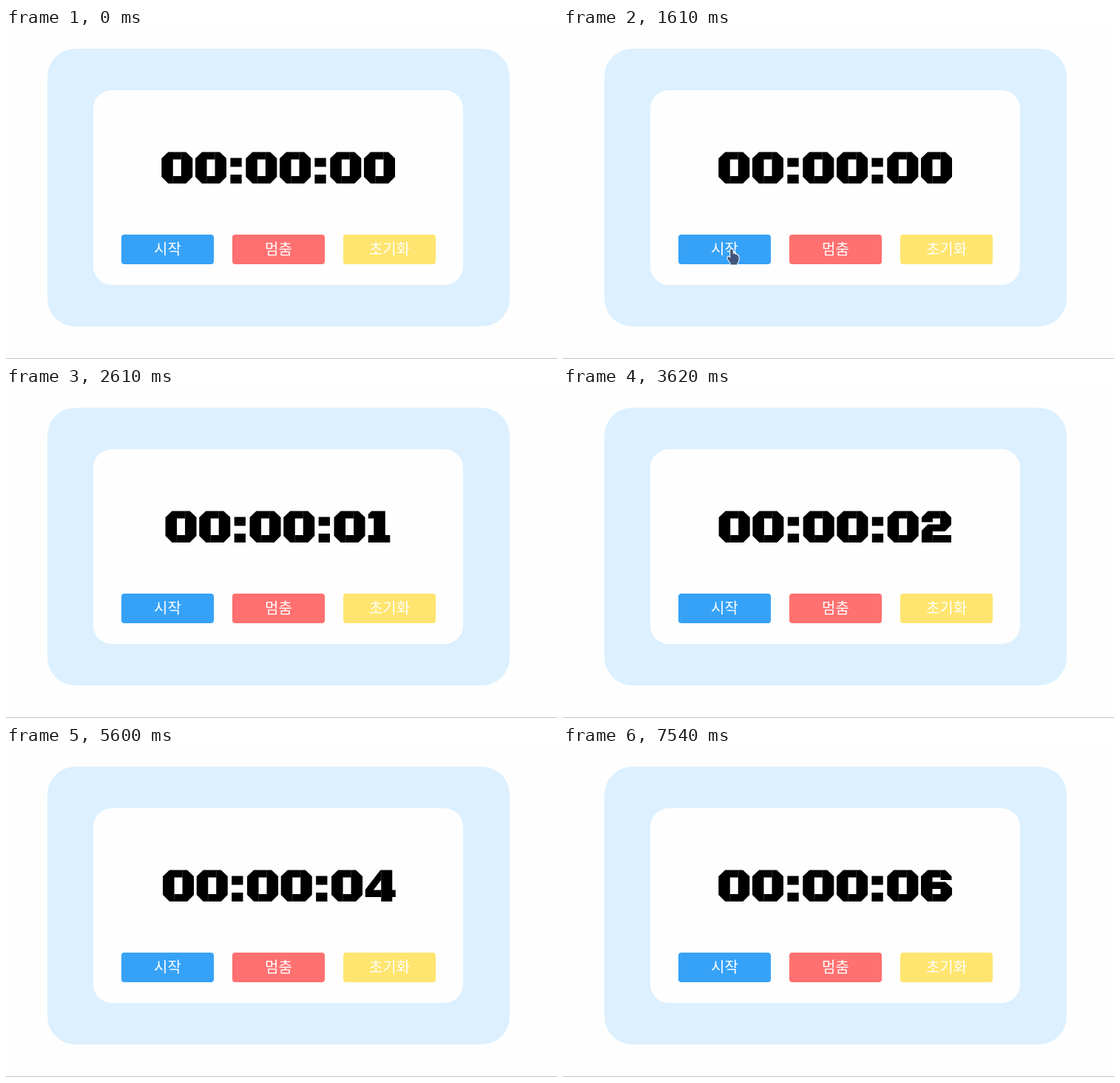
An HTML page with a canvas for the animation above (8000 ms loop, 745 by 447 pixels).

```html
<!DOCTYPE html>
<html lang="ko">
<head>
<meta charset="utf-8">
<title>스톱워치</title>
<style>
  html, body { margin: 0; width: 100%; height: 100%; overflow: hidden; background: #fefefe; }
  canvas { display: block; }
</style>
</head>
<body>
<canvas id="stage" width="745" height="447"></canvas>
<script>
const ctx = document.getElementById('stage').getContext('2d');
const LOOP = 8000;
const TICKS = [2610, 3620, 4610, 5600, 6550, 7540];

// Each glyph: advance width, outline, and hairline seams where its strokes meet.
const glyph = (advance, outline, seams = '') =>
  ({ advance, shape: new Path2D(outline), seams: new Path2D(seams) });

const GLYPHS = {
  '0': glyph(45.7, 'M9 .5H33L42 9V34L33 43H9L0 34V9ZM15.5 10.5V33H26.5V10.5Z', 'M26.5 .5V10.5M15.5 33V43'),
  '1': glyph(35.2, 'M5 .5H23.5V33H30V43H.5V33H8V10.5H.5V5Z'),
  '2': glyph(44.9, 'M9 .5H32L40.5 9V19L32 28H15.5V33H40.5V43H.5V27L9 18.5H25.5V10.5H15.5V15.5H.5V9Z', 'M25.5 .5V10.5M15.5 28V43'),
  '3': glyph(44.9, 'M9 .5H32L40.5 9V17L36 21.5L40.5 26V34L32 43H9L.5 34V28H15.5V33H25.5V26H13V17H25.5V10.5H15.5V15.5H.5V9Z', 'M25.5 .5V10.5M15.5 33V43'),
  '4': glyph(42.2, 'M20.5 .5H36.5V27.5H41V37H36.5V43H21.5V37H0V27ZM21.5 14L11 27.5H21.5Z', 'M21.5 .5V14M21.5 27.5V37'),
  '5': glyph(45.7, 'M.5 .5H40.5V10.5H15.5V16.5H33L42 25V34L33 43H9L0 34V28H15.5V33H26.5V26H.5Z', 'M26.5 16.5V26M15.5 33V43'),
  '6': glyph(45.7, 'M9 .5H33L41.5 9V14H26.5V10.5H15.5V16.5H33L42 25V34L33 43H9L0 34V9ZM15.5 26V33H26.5V26Z', 'M26.5 .5V10.5M15.5 33V43'),
  ':': glyph(22.6, 'M1.7 8.5H17V20.5H1.7ZM1.7 31H17V43H1.7Z')
};

const ARROW = new Path2D('M.5 .5V16.5L4.2 13L6.7 18.5L9 17.5L6.6 12H11.5Z');
const HAND = new Path2D('M-1.8 2Q0 -1 1.8 2V7Q4 5.8 5 8Q7.2 7 8 9.2Q9.5 9 9.5 11V15Q9.5 18 7.5 19.5V21.5H-1.5V19.5L-5.5 13.5Q-6 10 -3.5 11L-1.8 13Z');

// Pointer keys: x, y of the tip, spread evenly over the span; it rests on the last one.
const ENTER = { start: 810, end: 1150, keys: [[207, 405], [210, 396], [212, 384], [217, 356], [223, 327], [226, 312]] };
const LEAVE = { start: 1480, end: 2010, keys: [[226, 306], [228, 298], [228, 298], [240, 326], [280, 380], [332, 429]] };

function box(x, y, w, h, r, color) {
  ctx.fillStyle = color;
  ctx.beginPath();
  ctx.roundRect(x, y, w, h, r);
  ctx.fill();
}

function button(x, label, color) {
  box(x, 279, 125, 40, 4, color);
  ctx.fillStyle = '#fff';
  ctx.fillText(label, x + 62.5, 306);
}

function drawTime(text) {
  const width = [...text].reduce((sum, c) => sum + GLYPHS[c].advance, 0);
  let x = 370 - width / 2;
  ctx.fillStyle = '#000';
  ctx.strokeStyle = 'rgba(255,255,255,.22)';
  ctx.lineWidth = 0.8;
  for (const c of text) {
    const { advance, shape, seams } = GLYPHS[c];
    ctx.save();
    ctx.translate(x, 167);
    ctx.fill(shape, 'evenodd');
    ctx.stroke(seams);
    ctx.restore();
    x += advance;
  }
}

function pointerAt(t) {
  if (t < ENTER.start || t >= LEAVE.end) return null;
  const { start, end, keys } = t < LEAVE.start ? ENTER : LEAVE;
  const steps = keys === ENTER.keys ? keys.length - 1 : keys.length;
  const i = Math.floor((t - start) / (end - start) * steps);
  return keys[Math.min(i, keys.length - 1)];
}

function drawPointer([x, y]) {
  const overButton = x >= 156 && x <= 281 && y >= 279 && y < 319;
  const shape = overButton ? HAND : ARROW;
  ctx.save();
  ctx.translate(x, y);
  ctx.lineJoin = 'round';
  ctx.lineWidth = 2;
  ctx.strokeStyle = '#fff';
  ctx.stroke(shape);
  ctx.fillStyle = '#40557a';
  ctx.fill(shape);
  ctx.restore();
}

function draw() {
  const t = performance.now() % LOOP;
  ctx.fillStyle = '#fefefe';
  ctx.fillRect(0, 0, 745, 447);
  ctx.fillStyle = '#c6c6c6';
  ctx.fillRect(0, 446, 745, 1);

  box(56, 28, 625, 375, 37.5, '#dcf0ff');
  box(118, 84, 500, 263, 25, '#fefefe');

  ctx.font = '20px "Noto Sans CJK KR", "Noto Sans CJK", sans-serif';
  ctx.textAlign = 'center';
  button(156, '시작', '#36a2f7');
  button(306, '멈춤', '#ff7070');
  button(456, '초기화', '#ffe570');

  const seconds = TICKS.filter(tick => t >= tick).length;
  drawTime('00:00:0' + seconds);

  const pointer = pointerAt(t);
  if (pointer) drawPointer(pointer);
  requestAnimationFrame(draw);
}
draw();
</script>
</body>
</html>
```
